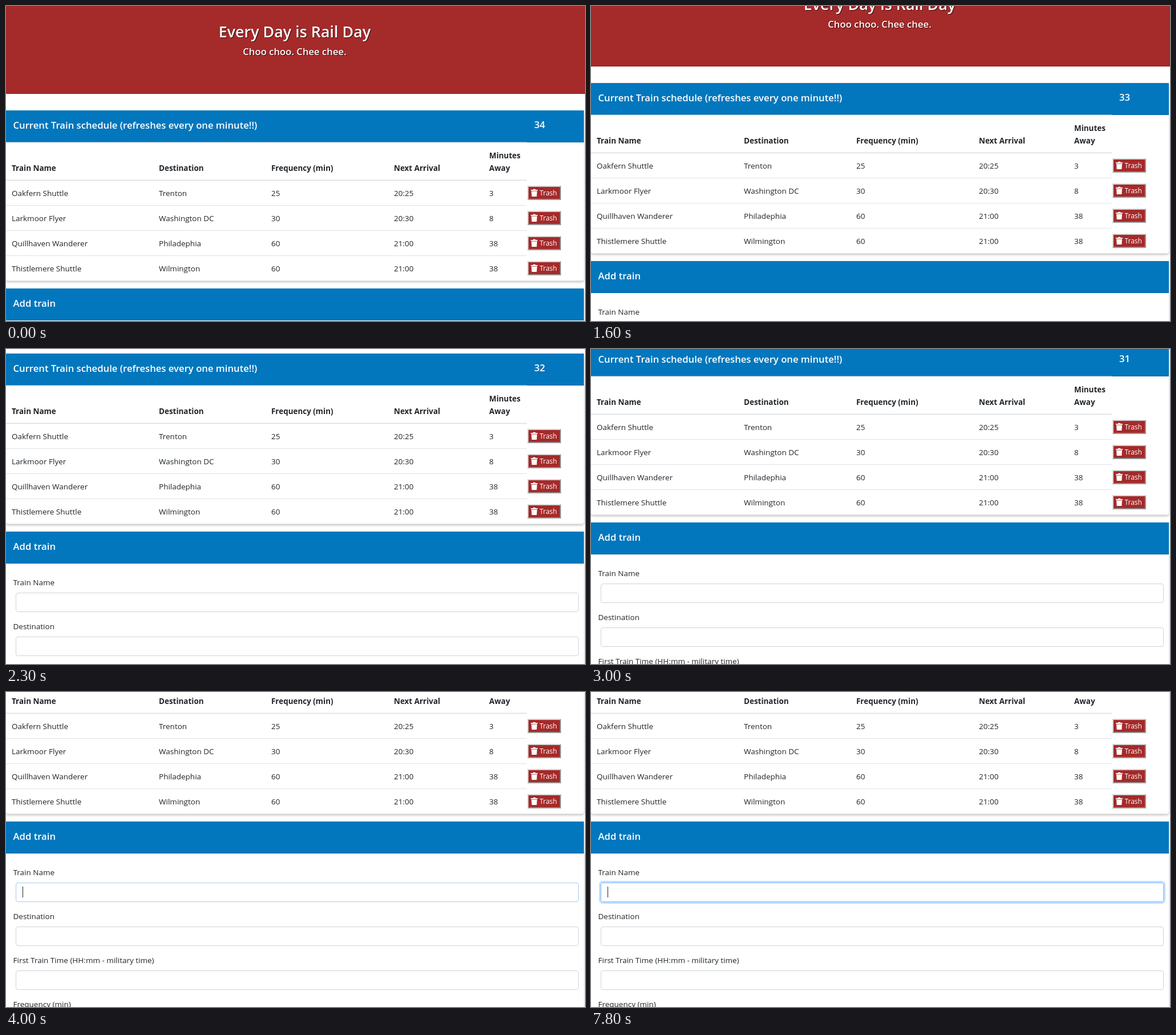
An HTML page for the animation above (8 s loop, 1015 by 552 pixels).

```html
<!DOCTYPE html>
<html lang="en">
<head>
<meta charset="utf-8">
<title>Train schedule</title>
<style>
  html, body { margin: 0; width: 100%; height: 100%; overflow: hidden; background: #fff; }
  svg { display: block; width: 1015px; height: 552px; }
  text { font: 13.5px "Open Sans", sans-serif; fill: #212529; white-space: pre; }
  .th { font-size: 13.45px; font-weight: 700; }
  .bar { font-size: 16.7px; font-weight: 600; fill: #fff; }
  .title { font-size: 26.9px; font-weight: 600; fill: #fff; }
  .banner { text-anchor: middle; filter: drop-shadow(1.5px 1.5px 0.6px #000a); }
  .button { font-size: 12px; fill: #fff; }
  .card { fill: #fff; filter: drop-shadow(0 2px 2px #0004); }
  .input { fill: #fff; stroke: #ced4da; }
</style>
</head>
<body>
<svg viewBox="0 0 1015 552"><g id="page"></g></svg>
<script>
const LOOP = 8000;
const COLUMNS = [10, 268, 465, 680, 847];
const TRAINS = [
  ['Oakfern Shuttle', 'Trenton', '25', '20:25', '3'],
  ['Larkmoor Flyer', 'Washington DC', '30', '20:30', '8'],
  ['Quillhaven Wanderer', 'Philadephia', '60', '21:00', '38'],
  ['Thistlemere Shuttle', 'Wilmington', '60', '21:00', '38'],
];
const FIELDS = ['Train Name', 'Destination', 'First Train Time (HH:mm - military time)', 'Frequency (min)'];

// Each list holds [start time, value]; a value holds until the next start.
const SCROLL = [[0, 0], [1600, 48], [1700, 86], [1800, 90], [2200, 136], [2300, 175],
  [2400, 180], [3000, 191], [3100, 251], [3200, 268]];
const SECONDS = [[0, 34], [900, 33], [1800, 32], [2800, 31]];
const CARET = [[0, 0], [4000, 1], [4500, 0], [4900, 1], [5400, 0], [5900, 1], [6400, 0], [6900, 1], [7400, 0], [7800, 1]];
const FOCUS = [[0, 0], [4000, 1], [4100, 2]];
const valueAt = (steps, t) => steps.findLast(([start]) => t >= start)[1];

const text = (x, y, str, cls = '', id = '') => `<text x="${x}" y="${y}" class="${cls}" id="${id}">${str}</text>`;
const rect = (x, y, w, h, attrs) => `<rect x="${x}" y="${y}" width="${w}" height="${h}" ${attrs}/>`;
const rule = (y, h = 1) => rect(0, y, 913, h, 'fill="#dee2e6"');

const bar = (y, label) =>
  rect(0, y, 1013, 56, 'fill="#0277bd"') +
  rect(0, y + 55, 1013, 1, 'fill="#0002"') +
  text(12.5, y + 31.5, label, 'bar');

const trashButton = y => `<g transform="translate(914 ${y})">
  <path d="M0 25V0H59L57 2H2V23z" fill="#d3d3d3"/>
  <path d="M0 25H59V0L57 2V23H2z" fill="#999"/>
  ${rect(2, 2, 55, 21, 'fill="#a52a2a"')}
  <path d="M6 7h3.5l1-1.3h3l1 1.3H18v1.8H6zM7 9.6H17L16.3 19H7.7z" fill="#fff"/>
  ${text(21.5, 17, 'Trash', 'button')}</g>`;

const trainRow = (cells, i) => {
  const y = 333 + 44 * i;
  return cells.map((cell, c) => text(COLUMNS[c], y, cell)).join('') +
    trashButton(y - 18) + (i < 3 ? rule(y + 16) : '');
};

const field = (label, i) => {
  const y = 589 + 77 * i;
  return text(12.5, y, label) + rect(17.5, y + 13.5, 986, 33, `rx="3.5" class="input" id="input${i}"`);
};

const page = document.getElementById('page');
page.innerHTML =
  rect(0, 0, 1015, 154, 'fill="#a52a2a"') +
  rect(0, 153, 1015, 1, 'fill="#0003"') +
  text(506, 55, 'Every Day is Rail Day', 'title banner') +
  text(506, 86, 'Choo choo. Chee chee.', 'bar banner') +
  rect(0, 183, 1013, 298.5, 'rx="4" class="card"') +
  bar(183, 'Current Train schedule (refreshes every one minute!!)') +
  text(926, 214, '', 'bar', 'seconds') +
  rule(238.5) +
  ['Train Name', 'Destination', 'Frequency (min)', 'Next Arrival', 'Away']
    .map((head, c) => text(COLUMNS[c], 288.5, head, 'th')).join('') +
  text(847, 267, 'Minutes', 'th') +
  rule(304.5, 1.8) +
  TRAINS.map(trainRow).join('') +
  rect(0, 495, 1013, 500, 'class="card"') +
  bar(495, 'Add train') +
  FIELDS.map(field).join('') +
  rect(15.5, 600.5, 990, 37, 'rx="5" fill="none" stroke="#bfdeff" stroke-width="3" id="glow"') +
  rect(29, 609, 1, 19, 'fill="#212529" id="caret"');

const [seconds, input, glow, caret] = ['seconds', 'input0', 'glow', 'caret'].map(id => document.getElementById(id));
const show = (el, on) => el.setAttribute('visibility', on ? 'visible' : 'hidden');

function draw(t) {
  const focus = valueAt(FOCUS, t);
  page.setAttribute('transform', `translate(0 ${-valueAt(SCROLL, t)})`);
  seconds.textContent = valueAt(SECONDS, t);
  input.style.stroke = ['#ced4da', '#a9c9ec', '#80bdff'][focus];
  show(glow, focus === 2);
  show(caret, valueAt(CARET, t));
}

const start = performance.now();
function tick() {
  draw((performance.now() - start) % LOOP);
  requestAnimationFrame(tick);
}
tick();
</script>
</body>
</html>
```
